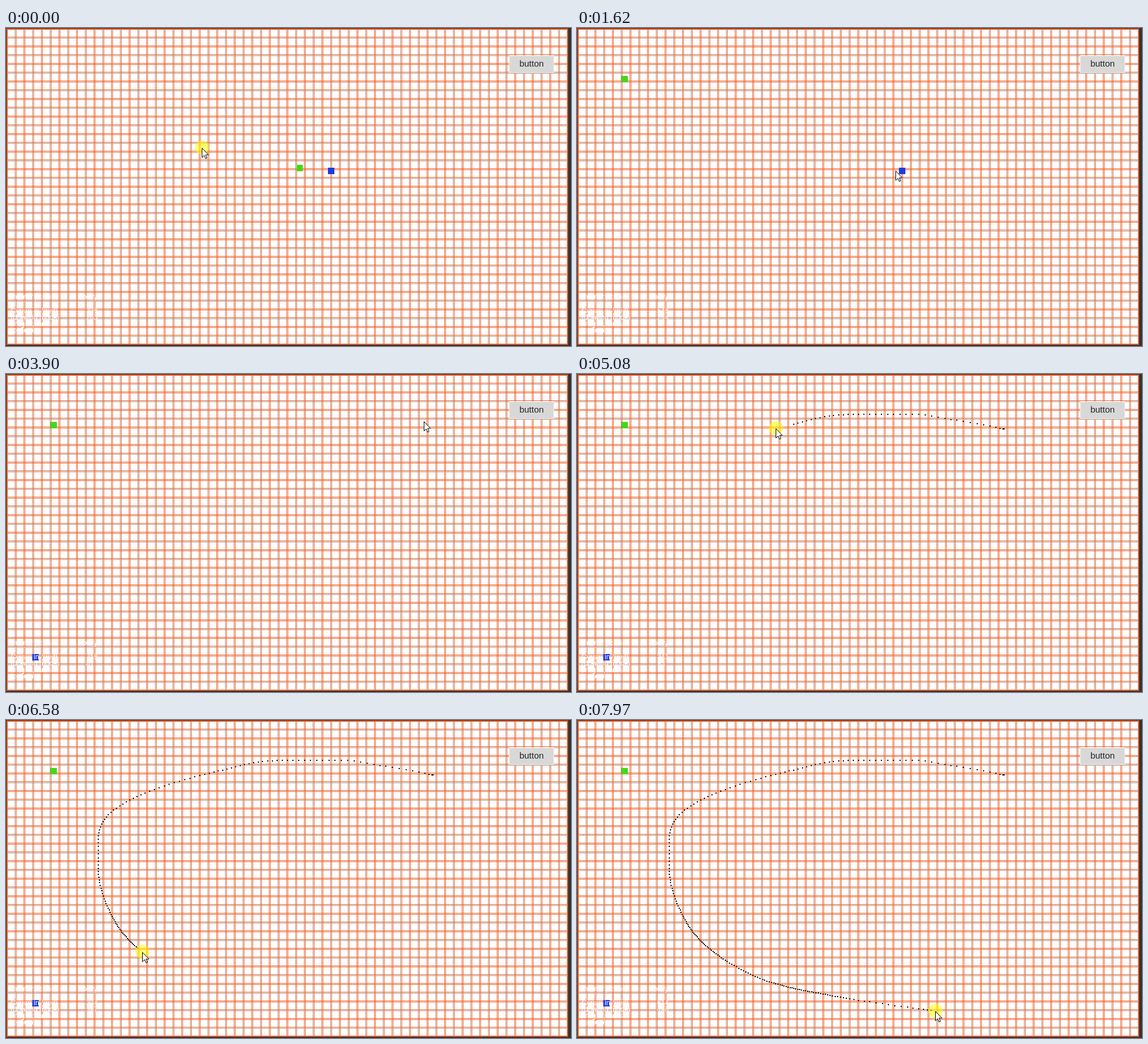
An HTML page for the animation above (8000 ms loop, 967 by 544 pixels).

```html
<!DOCTYPE html>
<html lang="en">
<head>
<meta charset="utf-8">
<title>Drag and draw</title>
<style>
  html, body { margin: 0; width: 100%; height: 100%; overflow: hidden; background: #333; }
  svg { display: block; width: 967px; height: 544px; }
  .crisp { shape-rendering: crispEdges; }
  .info { font: 12px "Liberation Sans", Arial, sans-serif; fill: #fff; }
  .label { font: 15px "Liberation Sans", Arial, sans-serif; fill: #222; text-anchor: middle; }
</style>
</head>
<body>
<svg viewBox="0 0 967 544">
  <defs>
    <pattern id="cols" width="30" height="30" patternUnits="userSpaceOnUse">
      <path class="crisp" d="M0 0h1v30h-1zM2 0h1v30h-1zM17 0h1v30h-1z" fill="#f0622a"/>
      <path class="crisp" d="M15 0h1v30h-1z" fill="#b08a78"/>
    </pattern>
    <pattern id="rows" width="30" height="30" patternUnits="userSpaceOnUse">
      <path class="crisp" d="M0 0h30v1h-30zM0 2h30v1h-30zM0 15h30v1h-30z" fill="#f0622a"/>
      <path class="crisp" d="M0 17h30v1h-30z" fill="#b09488"/>
    </pattern>
  </defs>
  <rect width="967" height="544" fill="#333"/>
  <g class="crisp">
    <rect x="1" y="1" width="961" height="541" fill="#fff"/>
    <rect x="1" y="1" width="961" height="541" fill="url(#cols)"/>
    <rect x="1" y="1" width="961" height="541" fill="url(#rows)"/>
    <rect x="1.5" y="1.5" width="960" height="540" fill="none" stroke="#f0622a"/>
  </g>
  <rect x="861" y="47" width="77" height="30" rx="2" fill="#f4f0ee"/>
  <rect x="862" y="48" width="75" height="28" rx="2" fill="#d8d8d8"/>
  <text class="label" x="899.5" y="66">button</text>
  <rect id="green" class="crisp" width="11" height="11" fill="#48d51a"/>
  <rect id="blue" class="crisp" width="11" height="11" fill="#1f3bdc"/>
  <g class="info">
    <text x="8" y="464">Pointer position</text><text x="134" y="464">x / y</text>
    <text x="8" y="476">pixels</text>
    <text x="8" y="488">Cursor in (grid)</text><text id="px" x="137" y="488"></text>
    <text x="8" y="499">(drawing mode)</text><text id="py" x="137" y="499"></text>
    <text x="8" y="510">drag squares</text>
    <text x="8" y="521">to move</text>
  </g>
  <path id="trail" class="crisp" fill="#111"/>
  <circle id="press" r="12" fill="#ff0" fill-opacity=".55"/>
  <path id="arrow" d="M.5 .5V16.5L4.2 13L6.6 18.5L9 17.5L6.7 12H11.5Z" fill="#fff" stroke="#000"/>
</svg>
<script>
const LOOP = 8000;
const DRAG_LAG = 150;               // squares follow the pointer late
const DRAW = 4330, DOT_MS = 17.5, DOT_LAG = 52;
const $ = id => document.getElementById(id);

// pointer route: time, x, y
const route = [
  // green square
  [-150, 503, 240], [0, 337, 205], [520, 82, 88], [690, 90, 87], [830, 132, 147],
  // blue square
  [1620, 546, 244], [1770, 559, 247], [1980, 559, 247], [2290, 281, 314], [2440, 225, 372],
  [2900, 48, 485], [3050, 53, 487], [3630, 667, 17], [3900, 716, 81], [4040, 731, 94],
  // drawn curve
  [DRAW, 731, 94], [4490, 649, 79], [4610, 574, 69], [4785, 473, 69], [5080, 341, 93],
  [5345, 218, 134], [5538, 166, 174], [5643, 158, 204], [5783, 158, 254], [6150, 185, 342],
  [6580, 234, 397], [7042, 333, 449], [7637, 461, 476], [7970, 614, 498]
];
const squares = [
  { id: "green", grab: -150, drop: 520, offset: 6 },
  { id: "blue", grab: 1980, drop: 3050, offset: 8 }
];

const slope = (i, axis) => {
  const a = route[i], b = route[i + 1];
  return a && b ? (b[axis] - a[axis]) / (b[0] - a[0]) : 0;
};

// harmonic mean of both sides: smooth, without overshoot
function tangent(i, axis) {
  const a = slope(i - 1, axis), b = slope(i, axis);
  return a * b > 0 ? 2 * a * b / (a + b) : 0;
}

function pointerAt(t) {
  const end = route.length - 1;
  if (t >= route[end][0]) return route[end].slice(1);
  const i = route.findIndex(k => k[0] > t) - 1;
  const span = route[i + 1][0] - route[i][0], u = (t - route[i][0]) / span, v = 1 - u;
  return [1, 2].map(axis => Math.round(
    v * v * (1 + 2 * u) * route[i][axis] + u * u * (1 + 2 * v) * route[i + 1][axis] +
    span * u * v * (v * tangent(i, axis) - u * tangent(i + 1, axis))
  ));
}

function move(id, x, y) {
  $(id).setAttribute("transform", `translate(${x} ${y})`);
}

const isHeld = t => t >= DRAW - 150 || squares.some(s => t >= s.grab && t < s.drop);

function trailAt(t) {
  let d = "";
  for (let s = DRAW; s <= t - DOT_LAG; s += DOT_MS) {
    const [x, y] = pointerAt(s);
    d += `M${x - 1} ${y - 1}h2v2h-2z`;
  }
  return d;
}

function render(t) {
  const [x, y] = pointerAt(t);
  move("arrow", x - 1, y);
  move("press", x - .5, y - .5);
  $("press").setAttribute("visibility", isHeld(t) ? "visible" : "hidden");
  for (const { id, grab, drop, offset } of squares)
    move(id, ...pointerAt(Math.min(drop, Math.max(grab, t - DRAG_LAG))).map(v => v - offset));
  $("trail").setAttribute("d", trailAt(t));
  $("px").textContent = x;
  $("py").textContent = y;
}

const start = performance.now();
function frame() {
  render((performance.now() - start) % LOOP);
  requestAnimationFrame(frame);
}
frame();
</script>
</body>
</html>
```
